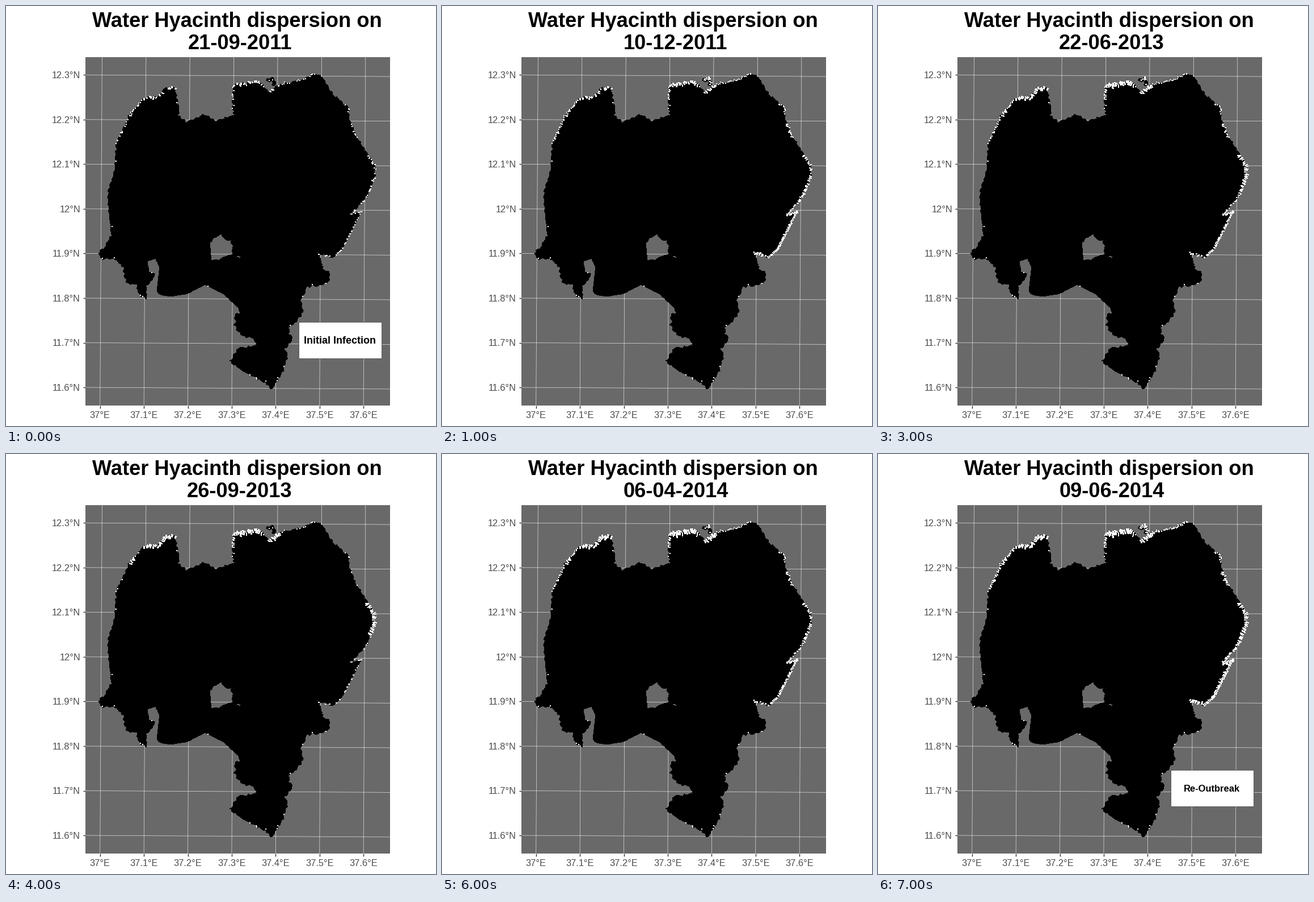
Recreate the animation shown at these times as a matplotlib script. Size 758 by 739 pixels, loop 8000 ms.

```python
import numpy as np
import matplotlib.pyplot as plt
from matplotlib.animation import FuncAnimation
from matplotlib.collections import LineCollection, PolyCollection
from matplotlib.patches import PathPatch, Rectangle
from matplotlib.path import Path

W, H, DPI = 758, 739, 64
PX = 72 / DPI  # points per pixel
LEFT, RIGHT, TOP, BOTTOM = 140, 677, 90, 703
LAND, AXIS_TEXT = "#696969", "#4d4d4d"

DATES = ["21-09-2011", "10-12-2011", "19-04-2013", "22-06-2013",
         "26-09-2013", "12-10-2013", "06-04-2014", "09-06-2014"]
NOTES = {0: ("Initial Infection", 18),
         5: ("After a Removal\nCampaign", 16.6),
         7: ("Re-Outbreak", 16.5)}

# Key points of the shore, anticlockwise from the western tip
SOUTHWEST = [(165, 430), (167, 443), (195, 446), (207, 460), (212, 487),
             (231, 490), (234, 507), (248, 515), (246, 492), (263, 475)]
GULF = [(262, 471), (252, 468), (249, 449), (264, 444), (271, 460), (266, 502),
        (272, 508), (289, 511), (320, 506), (351, 490), (384, 507), (409, 530)]
SOUTH = [(413, 540), (404, 543), (405, 566), (418, 582), (436, 583), (444, 598),
         (411, 602), (395, 626), (428, 648), (456, 661), (468, 674), (486, 646),
         (496, 615), (491, 603), (505, 586), (495, 566), (510, 558), (523, 538),
         (519, 518), (530, 495), (568, 487), (571, 471), (559, 462), (550, 435),
         (568, 440)]
SPIT = [(576, 443), (592, 428), (626, 362)]
EAST = [(608, 367), (634, 338), (650, 302), (651, 284), (638, 262), (617, 230),
        (605, 200), (604, 180), (576, 156), (558, 126), (545, 119), (520, 130),
        (482, 139)]
NORTH = [(463, 151), (445, 133), (402, 139), (399, 162), (402, 192), (370, 203),
         (350, 191), (318, 205), (303, 193), (305, 183), (297, 143), (280, 144),
         (268, 161), (245, 161)]
WEST = [(219, 190), (195, 240), (192, 288), (179, 333), (186, 403), (173, 427)]
SHORES = [(SOUTHWEST, 1), (GULF, 0.2), (SOUTH, 1), (SPIT, 0.2),
          (EAST, 0.8), (NORTH, 0.9), (WEST, 0.8)]
ISLAND = [(359, 417), (366, 408), (379, 402), (387, 411), (396, 412),
          (400, 422), (399, 437), (375, 446), (362, 447)]
ISLET = [(404, 441), (409, 439), (413, 441), (413, 444)]
SPUR = [(462, 131), (469, 128), (474, 135), (470, 141)]

# Infested stretches of shore: start, end, depth of the mat
BAYS = [((482, 139), (463, 151), 7), ((450, 138), (402, 139), 8),
        ((402, 139), (399, 165), 2.5), ((297, 145), (270, 158), 8),
        ((268, 161), (243, 163), 5), ((224, 184), (218, 192), 4)]
COAST = [((550, 435), (568, 440), 5), ((576, 443), (626, 362), 4.5),
         ((626, 362), (608, 367), 5), ((608, 367), (634, 338), 2.5),
         ((634, 338), (645, 315), 4), ((617, 230), (607, 208), 3),
         ((604, 190), (592, 172), 2), ((545, 119), (482, 139), 2),
         ((240, 167), (196, 237), 2.2)]
EAST_BAY = [((642, 320), (638, 262), 6)]


def levels(k):
    """Share of each zone that is overgrown on date k."""
    return (np.interp(k, [0, 2, 7], [0.35, 0.75, 1]),
            np.interp(k, [0, 2, 4, 5, 7], [0.3, 1, 0.15, 0.15, 1]),
            np.interp(k, [0, 4, 5, 6, 7], [0.25, 0.9, 0.9, 0.4, 0.8]))


def rough(points, amp, rng, end=None):
    """Join key points by a scalloped, jittered coast."""
    pts = np.array(points + [end or points[0]], float)
    out = []
    for a, b in zip(pts[:-1], pts[1:]):
        length = np.hypot(*(b - a))
        s = np.linspace(0, 1, max(1, int(length / 2.5)), endpoint=False)[:, None]
        dx, dy = (b - a) / length
        bulge = amp * 2.5 * (np.abs(np.sin(np.pi * s * length / 11)) - 0.5)
        line = a + s * (b - a) + bulge * np.array([-dy, dx])
        out.append(line + rng.normal(0, amp * 0.8, line.shape))
    return np.vstack(out)


def closed(ring):
    return Path(np.vstack([ring, ring[:1]]), closed=True)


def stretch(start, end):
    """Part of the coast between the vertices nearest to two points."""
    i, j = (np.argmin(np.hypot(*(coast - p).T)) for p in (start, end))
    return coast[i:j + 1]


def mat_cells(line, depth, level, seed):
    """Pixel blocks that grow from a line towards open water."""
    rng = np.random.default_rng(seed)
    tangent = np.gradient(line, axis=0)
    tangent = sum(np.roll(tangent, i, axis=0) for i in (-1, 0, 1))
    normal = np.column_stack([tangent[:, 1], -tangent[:, 0]])
    normal /= np.hypot(*normal.T)[:, None] + 1e-6
    cells = []
    for p, n in zip(line, normal):
        chance, reach, size = rng.random(3)
        if chance > 1.6 * level:
            continue
        for s in np.arange(0, max(1, depth * level * (0.5 + 0.6 * reach)), 1.5):
            x, y = np.round(p + n * s - 1)
            w = 2 + (size > 0.5 and depth > 2)
            cells.append([(x, y), (x + w, y), (x + w, y + 2), (x, y + 2)])
    return cells


def infestation(k):
    bays, shore, east = levels(k)
    cells = mat_cells(coast, 1, 0.03, 50) + mat_cells(spur, 5, shore, 51)
    for zone, level in ((BAYS, bays), (COAST, shore), (EAST_BAY, east)):
        for seed, (start, end, depth) in enumerate(zone):
            cells += mat_cells(stretch(start, end), depth, level, seed)
    return cells


def label(x, y, text, size, **style):
    style = {"va": "baseline", "ha": "center", "color": "black", **style}
    return ax.text(x, y, text, fontsize=size * PX,
                   family="Liberation Sans", **style)


rng = np.random.default_rng(4)
coast = np.vstack([
    rough(pts, amp, rng, SHORES[(i + 1) % len(SHORES)][0][0])
    for i, (pts, amp) in enumerate(SHORES)])
spur = rough(SPUR[:-1], 0.6, rng, SPUR[-1])
lake = Path.make_compound_path(
    closed(coast), closed(rough(ISLAND, 0.6, rng)), closed(rough(ISLET, 0.2, rng)))

fig = plt.figure(figsize=(W / DPI, H / DPI), dpi=DPI, facecolor="white")
ax = fig.add_axes([0, 0, 1, 1])
ax.set_xlim(0, W)
ax.set_ylim(H, 0)
ax.axis("off")
ax.add_patch(Rectangle((LEFT, TOP), RIGHT - LEFT, BOTTOM - TOP,
                       fc=LAND, lw=0, zorder=0))

grid, ticks = [], []
for i in range(7):
    x = 165.7 + 77.4 * i
    grid.append([(x + 3.7, TOP), (x, BOTTOM)])
    ticks.append([(x, BOTTOM), (x, BOTTOM + 4.5)])
    label(x, 725, f"{37 + i / 10:g}°E", 16.4, color=AXIS_TEXT)
for i in range(8):
    y = 121.2 + 78.55 * i
    grid.append([(LEFT, y), (RIGHT, y + 2.9)])
    ticks.append([(LEFT - 4.5, y), (LEFT, y)])
    label(131, y + 6, f"{round(12.3 - i / 10, 1):g}°N", 16.4,
          ha="right", color=AXIS_TEXT)
ax.add_collection(LineCollection(grid, colors="white", alpha=0.75,
                                 linewidths=0.75 * PX, zorder=1))
ax.add_collection(LineCollection(ticks, colors="#333333",
                                 linewidths=1.4 * PX, zorder=1))

ax.add_patch(PathPatch(lake, fc="black", lw=0, aa=False, zorder=2))
ax.plot(*spur.T, color="black", lw=4 * PX, aa=False, zorder=2)
mats = PolyCollection([], facecolors="white", linewidths=0,
                      antialiaseds=False, zorder=3)
ax.add_collection(mats)

label(407.5, 37, "Water Hyacinth dispersion on", 36.3, weight="bold")
date = label(412, 76, "", 36.3, weight="bold")
card = Rectangle((516, 555.5), 146, 64.5, fc="white", ec="#4a4a4a",
                 lw=0.8 * PX, zorder=4)
ax.add_patch(card)
note = label(588.5, 589, "", 16.6, weight="bold", va="center",
             multialignment="left", linespacing=1.1, zorder=5)

cells = [infestation(k) for k in range(len(DATES))]


def show(k):
    text, size = NOTES.get(k, ("", 16.6))
    date.set_text(DATES[k])
    mats.set_verts(cells[k])
    card.set_visible(bool(text))
    note.set_text(text)
    note.set_fontsize(size * PX)
    return date, mats, card, note


anim = FuncAnimation(fig, show, frames=len(DATES), interval=1000, repeat=True)
plt.show()
```
